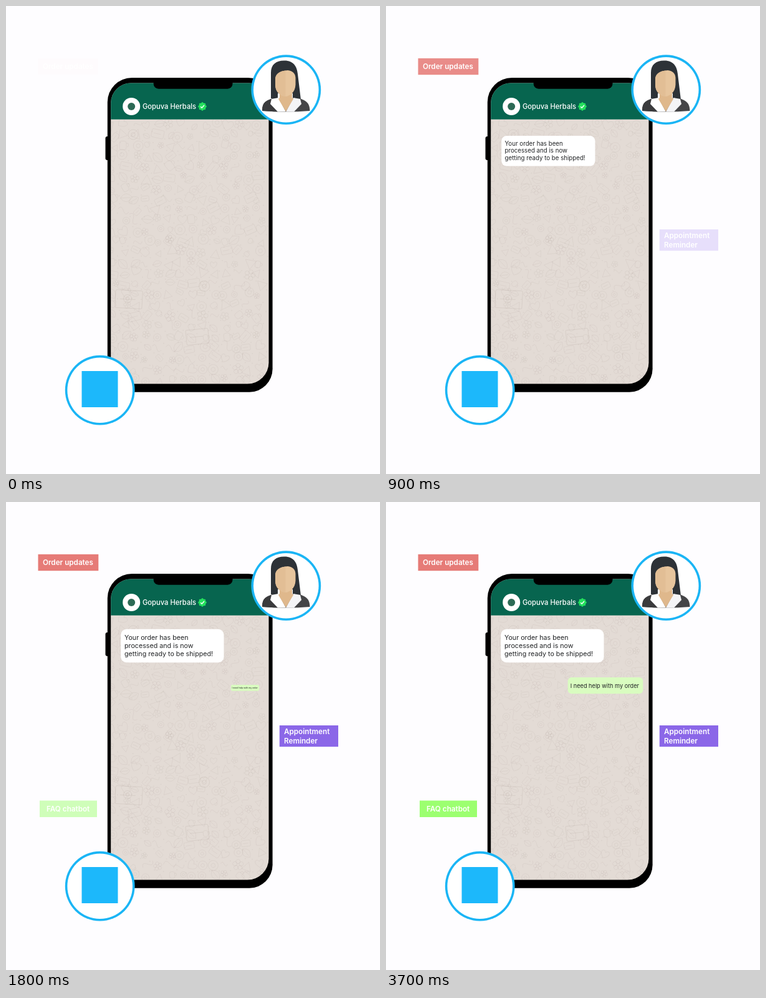
Write an HTML page with a canvas that moves like this. It is 600x750 px and loops after 3900 ms.

```html
<!DOCTYPE html>
<html lang="en">
<head>
<meta charset="utf-8">
<title>Chat updates</title>
<style>
  html, body { margin: 0; width: 100%; height: 100%; overflow: hidden; background: #fefdff; }
  canvas { display: block; width: 600px; height: 750px; }
</style>
</head>
<body>
<canvas id="stage"></canvas>
<script>
const W = 600, H = 750, LOOP = 3900, STEP = 100;
const SANS = 'Inter, "Noto Sans", sans-serif';
const RING = '#1ab5f5';
const ratio = window.devicePixelRatio || 1;
const stage = document.getElementById('stage');
const view = prepare(stage);
const backdrop = document.createElement('canvas');

function prepare(canvas) {
  canvas.width = W * ratio;
  canvas.height = H * ratio;
  const c = canvas.getContext('2d');
  c.scale(ratio, ratio);
  return c;
}

function box(c, x, y, w, h, r, fill) {
  c.beginPath();
  c.roundRect(x, y, w, h, r);
  c.fillStyle = fill;
  c.fill();
}

function disc(c, x, y, r, fill) {
  c.beginPath();
  c.arc(x, y, r, 0, Math.PI * 2);
  c.fillStyle = fill;
  c.fill();
}

function shape(c, d, fill) {
  c.fillStyle = fill;
  c.fill(new Path2D(d));
}

function text(c, lines, x, y, leading, font, fill) {
  c.font = `${font} ${SANS}`;
  c.fillStyle = fill;
  lines.forEach((line, i) => c.fillText(line, x, y + i * leading));
}

function seeded(seed) {
  return () => (seed = (seed * 16807) % 2147483647) / 2147483647;
}

// Small line drawings, each about s pixels across and centred on the origin.
const doodles = [
  (c, s) => { c.arc(0, 0, s * .5, 0, 7); c.moveTo(s * .2, 0); c.arc(0, 0, s * .2, 0, 7); },
  (c, s) => { c.roundRect(-s * .6, -s * .4, s * 1.2, s * .8, 2); c.moveTo(-s * .4, 0); c.lineTo(s * .3, 0); },
  (c, s) => {
    c.moveTo(0, s * .5);
    c.bezierCurveTo(-s, -s * .2, -s * .3, -s * .8, 0, -s * .25);
    c.bezierCurveTo(s * .3, -s * .8, s, -s * .2, 0, s * .5);
  },
  (c, s) => {
    for (let a = 0; a < 6.2; a += Math.PI * 2 / 5) {
      const x = Math.cos(a) * s * .32, y = Math.sin(a) * s * .32;
      c.moveTo(x + s * .2, y);
      c.arc(x, y, s * .2, 0, 7);
    }
  },
  (c, s) => {
    c.moveTo(-s * .6, 0);
    c.quadraticCurveTo(0, -s * .8, s * .6, 0);
    c.quadraticCurveTo(0, s * .8, -s * .6, 0);
    c.lineTo(s * .4, 0);
  },
  (c, s) => { c.moveTo(0, -s * .5); c.lineTo(s * .5, s * .4); c.lineTo(-s * .5, s * .4); c.closePath(); },
  (c, s) => {
    c.moveTo(-s * .6, 0);
    c.bezierCurveTo(-s * .2, -s, s * .2, s, s * .6, 0);
  },
  (c, s) => { c.roundRect(-s * .35, -s * .4, s * .7, s * .9, 3); c.moveTo(s * .35, -s * .1); c.arc(s * .4, 0, s * .2, -1.5, 1.5); }
];

function doodle(c, kind, x, y, size, angle) {
  c.save();
  c.translate(x, y);
  c.rotate(angle);
  c.beginPath();
  doodles[kind](c, size);
  c.stroke();
  c.restore();
}

function wallpaper(c) {
  const rnd = seeded(4711);
  c.fillStyle = '#e3dbd5';
  c.fillRect(160, 120, 270, 490);
  c.lineWidth = .9;
  c.strokeStyle = c.fillStyle = 'rgba(130, 115, 105, .085)';
  for (let y = 190; y < 606; y += 17) {
    for (let x = 172; x < 424; x += 18) {
      const px = x + rnd() * 10 - 5, py = y + rnd() * 8 - 4;
      doodle(c, Math.floor(rnd() * doodles.length), px, py, 9 + rnd() * 8, rnd() * 2 - 1);
      c.fillRect(px + 8 + rnd() * 3, py + 7 + rnd() * 3, 1.5, 1.5);
    }
  }
  c.strokeStyle = 'rgba(130, 115, 105, .13)';
  doodle(c, 1, 197, 470, 36, .05);
  doodle(c, 0, 195, 469, 13, 0);
  doodle(c, 1, 307, 530, 30, -.1);
  doodle(c, 3, 262, 374, 13, 0);
  doodle(c, 0, 318, 449, 17, 0);
  doodle(c, 0, 204, 206, 16, 0);
}

function verifiedBadge(c, x, y) {
  c.beginPath();
  for (let a = 0; a < Math.PI * 2; a += .1) {
    const r = 6.3 + .6 * Math.cos(a * 8);
    c.lineTo(x + r * Math.cos(a), y + r * Math.sin(a));
  }
  c.fillStyle = '#23e05d';
  c.fill();
  c.beginPath();
  c.moveTo(x - 2.8, y + .2);
  c.lineTo(x - .8, y + 2.2);
  c.lineTo(x + 3, y - 2);
  c.strokeStyle = '#fff';
  c.lineWidth = 1.4;
  c.stroke();
}

function phone(c) {
  box(c, 159.5, 209, 8, 38, 3, '#000');
  box(c, 162.8, 115, 264.8, 503.7, [39, 39, 37, 39], '#000');
  c.save();
  c.beginPath();
  c.roundRect(168.2, 123.6, 253.3, 481.9, [32, 32, 34, 32]);
  c.clip();
  wallpaper(c);
  c.fillStyle = '#07654f';
  c.fillRect(160, 120, 270, 61.7);
  c.restore();
  box(c, 236.7, 119, 126.8, 13.7, [0, 0, 8, 8], '#000');

  disc(c, 201.2, 161, 14, '#fff');
  disc(c, 201.2, 161, 6, '#2c6a55');
  text(c, ['Gopuva Herbals'], 219, 165, 0, '500 11.2px', '#fff');
  verifiedBadge(c, 315, 161);
}

function ring(c, x, y) {
  disc(c, x, y, 55.9, RING);
  disc(c, x, y, 52.3, '#fff');
}

function customer(c) {
  ring(c, 449.3, 134.2);
  shape(c, 'M425 148V107C425 94 433 87.5 446 87.5C461 87 467 97 468 109L473 150H460V140H436V148Z', '#2d3237');
  shape(c, 'M411 168C411 155 416 152 428 148H471C482 152 487 155 487.5 168Q449 171 411 168Z', '#454547');
  shape(c, 'M411 168C411 155 416 152 428 148H449V169.5Q430 169.5 411 168Z', '#3b3b3d');
  shape(c, 'M437 147L426 149L424 157L436 169.5H449Z', '#fff');
  shape(c, 'M461 147L472 149L474 157L462 169.5H449Z', '#f4f4f6');
  shape(c, 'M439 134H459V147L461 149L449 169L437 149L439 147Z', '#dfb88c');
  shape(c, 'M432 116C433 108 440 104 452 103C460 104 464 108 464.5 115V126C464 138 456 144 448.5 145C440 144 432 138 432 126Z', '#e7c59d');
  shape(c, 'M432 116C433 108 440 104 448.5 103.4V145C440 144 432 138 432 126Z', '#e2be95');
}

function assistant(c) {
  ring(c, 150.7, 615.7);
  box(c, 121.5, 585, 58, 58, 0, '#1cb8fb');
}

function label(c, lines, x, y, w, h, inset, fill, start, t) {
  if (t < start) return;
  c.globalAlpha = Math.min(1, .01 + (t - start) / 1050);
  c.fillStyle = fill;
  c.fillRect(x, y, w, h);
  c.globalAlpha = 1;
  text(c, lines, x + inset, y + (lines.length > 1 ? 14 : 17.3), 15, '600 11.7px', '#fff');
}

// Grows from an anchor point with a cubic ease-out.
function grow(c, x, y, start, t, draw) {
  const p = Math.min(1, (t - start) / 400);
  if (p <= 0) return;
  const s = 1 - (1 - p) ** 3;
  c.save();
  c.translate(x, y);
  c.scale(s, s);
  c.translate(-x, -y);
  draw();
  c.restore();
}

function statusMessage(c) {
  box(c, 184.2, 203.8, 165.3, 53.4, 9, '#fff');
  text(c, ['Your order has been', 'processed and is now', 'getting ready to be shipped!'],
    190, 221, 13, '400 10.7px', '#222426');
}

function reply(c) {
  box(c, 291.7, 281, 120.6, 26.2, 6, '#d9fcc0');
  text(c, ['I need help with my order'], 295.7, 297.6, 0, '400 9.2px', '#222426');
}

function typing(c, t) {
  const from = 1000, to = 1700;
  if (t < from || t >= to) return;
  const active = Math.floor((t - from) / 200) % 3;
  box(c, 341, 37.5, 66, 34, 17, '#e3e1e5');
  disc(c, 402, 68, 5.5, '#e3e1e5');
  disc(c, 409.5, 76.7, 3.7, '#e3e1e5');
  for (let i = 0; i < 3; i++) {
    disc(c, 356 + i * 18, 54.5, 6, i === active ? '#8d8a93' : '#bab7c0');
  }
}

function paintBackdrop() {
  const c = prepare(backdrop);
  c.fillStyle = '#fefdff';
  c.fillRect(0, 0, W, H);
  phone(c);
  customer(c);
  assistant(c);
}

function render(t) {
  const c = view;
  c.drawImage(backdrop, 0, 0, W, H);
  label(c, ['Order updates'], 51.5, 83.8, 96.8, 26.4, 7.5, '#e67b77', 0, t);
  label(c, ['Appointment', 'Reminder'], 438.8, 358, 94.2, 34.2, 7.2, '#8b67e8', 700, t);
  label(c, ['FAQ chatbot'], 54, 478.5, 92, 26.5, 11, '#9cff70', 1300, t);
  grow(c, 195.6, 250, 680, t, () => statusMessage(c));
  typing(c, t);
  grow(c, 402.4, 300, 1742, t, () => reply(c));
}

const begin = performance.now();

function tick() {
  const t = (performance.now() - begin) % LOOP;
  render(Math.floor(t / STEP) * STEP);
  requestAnimationFrame(tick);
}

paintBackdrop();
tick();
</script>
</body>
</html>
```
